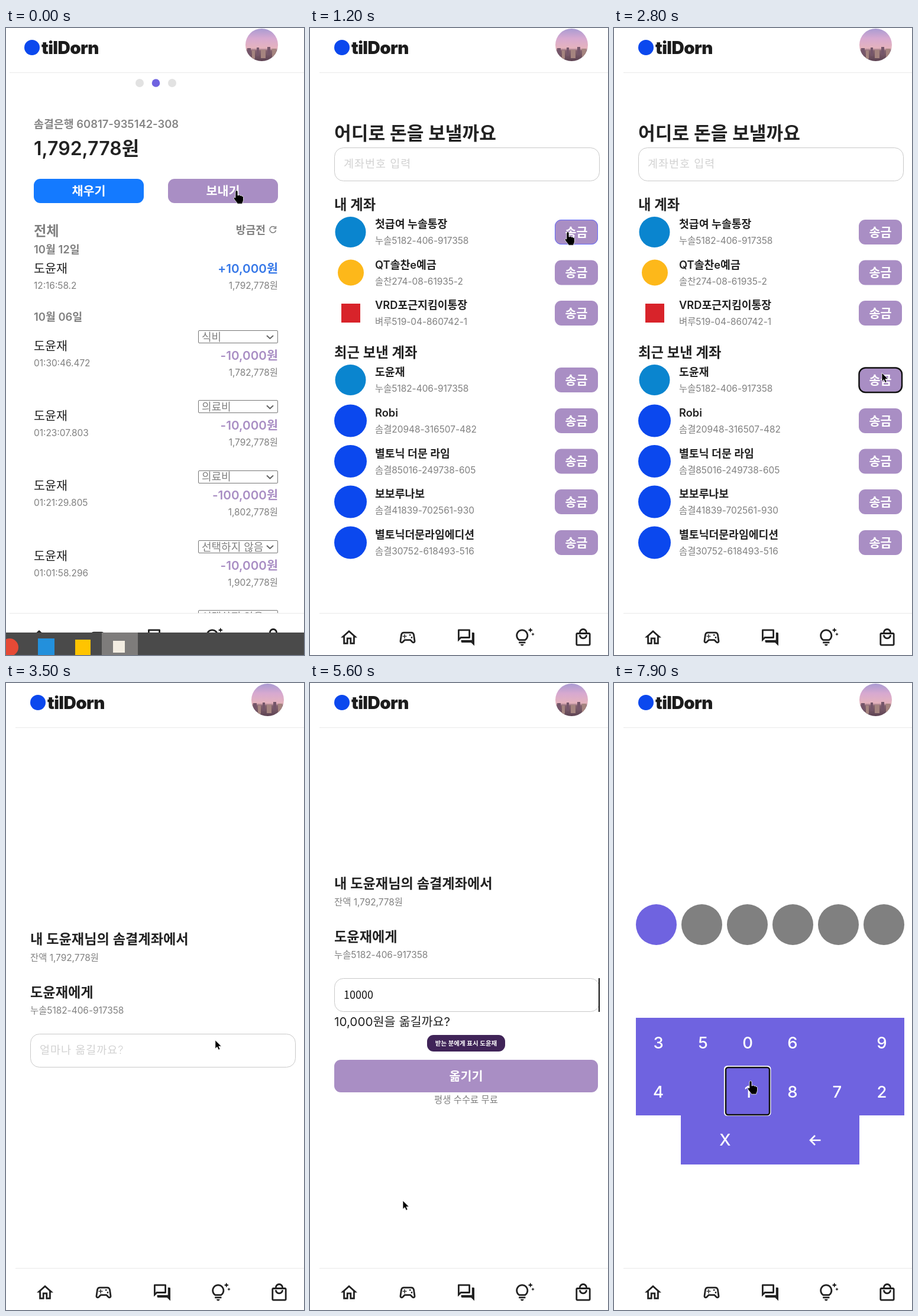
Animation of 504 by 1060 pixels, one loop 8 s. Source, as an HTML page:

```html
<!DOCTYPE html>
<html lang="ko">
<head>
<meta charset="utf-8">
<style>
html, body { margin: 0; height: 100%; overflow: hidden; background: #fff; }
svg { display: block; width: 504px; height: 1060px; font-family: Inter, 'Noto Sans CJK KR', sans-serif; }
.plain { font-family: 'Noto Sans CJK KR', 'Noto Sans CJK', sans-serif; }
text { white-space: pre; }
</style>
</head>
<body>
<svg id="stage" viewBox="0 0 504 1060"></svg>
<script>
const INK = '#222', GRAY = '#808080', LILAC = '#a98ec4', VIOLET = '#6f63e0', BLUE = '#0b48ee';
const BANK = '솜결', OWNER = '도윤재', ACCOUNT = '누솔5182-406-917358', BALANCE = '1,792,778원';

// Text centred vertically on cy
const text = (x, cy, s, size, fill = INK, weight = 400, anchor = 'start', extra = '') =>
  `<text x="${x}" y="${cy + size * .37}" font-size="${size}" fill="${fill}" font-weight="${weight}" text-anchor="${anchor}" ${extra}>${s}</text>`;
const rect = (x, y, w, h, fill, r = 0, extra = '') =>
  `<rect x="${x}" y="${y}" width="${w}" height="${h}" rx="${r}" fill="${fill}" ${extra}/>`;
const circle = (x, y, r, fill) => `<circle cx="${x}" cy="${y}" r="${r}" fill="${fill}"/>`;
const ring = (x, y, w, h, r, color = '#111', width = 2.5) =>
  rect(x, y, w, h, 'none', r, `stroke="${color}" stroke-width="${width}"`);
const button = (x, y, w, h, label, fill = LILAC) =>
  rect(x, y, w, h, fill, 11) + text(x + w / 2, y + h / 2, label, 20.7, '#fff', 600, 'middle');
const field = (y, value, hint) => ring(41.5, y + .5, 448, 56, 15, '#c9c9c9', 1) +
  (value ? text(57, y + 28, value, 18, '#111', 400, 'start', 'class="plain"')
         : text(57, y + 27.5, hint, 18.5, '#d2d2d2', 300, 'start', 'letter-spacing="1"'));

const icons = [
  'M12 5.69l5 4.5V18h-2v-6H9v6H7v-7.81l5-4.5M12 3L2 12h3v8h6v-6h2v6h6v-8h3L12 3z',
  'M21.58 16.09l-1.09-7.66C20.21 6.46 18.52 5 16.53 5H7.47C5.48 5 3.79 6.46 3.51 8.43l-1.09 7.66C2.2 17.63 3.39 19 4.94 19c.68 0 1.32-.27 1.8-.75L9 16h6l2.25 2.25c.48.48 1.13.75 1.8.75 1.56 0 2.75-1.37 2.53-2.91zm-2.1.72c-.08.09-.21.19-.42.19-.15 0-.29-.06-.39-.16L15.83 14H8.17l-2.84 2.84c-.1.1-.24.16-.39.16-.21 0-.34-.1-.42-.19-.08-.09-.16-.23-.13-.44l1.09-7.66C5.63 7.74 6.48 7 7.47 7h9.06c.99 0 1.84.74 1.98 1.72l1.09 7.66c.03.2-.05.34-.12.43zM9 8H8v2H6v1h2v2h1v-2h2v-1H9zM16 12a1 1 0 0 0 2 0 1 1 0 0 0-2 0zM14 9a1 1 0 0 0 2 0 1 1 0 0 0-2 0z',
  'M15 4v7H5.17L4 12.17V4h11m1-2H3c-.55 0-1 .45-1 1v14l4-4h10c.55 0 1-.45 1-1V3c0-.55-.45-1-1-1zm5 4h-2v9H6v2c0 .55.45 1 1 1h11l4 4V7c0-.55-.45-1-1-1z',
  'M7 20h4c0 1.1-.9 2-2 2s-2-.9-2-2zm-2-1h8v-2H5v2zm11.5-9.5c0 3.82-2.66 5.86-3.77 6.5H5.27c-1.11-.64-3.77-2.68-3.77-6.5C1.5 5.36 4.86 2 9 2s7.5 3.36 7.5 7.5zm-2 0C14.5 6.47 12.03 4 9 4S3.5 6.47 3.5 9.5c0 2.47 1.49 3.89 2.35 4.5h6.3c.86-.61 2.35-2.03 2.35-4.5zm6.87-2.13L20 8l1.37.63L22 10l.63-1.37L24 8l-1.37-.63L22 6l-.63 1.37zM19 6l.94-2.06L22 3l-2.06-.94L19 0l-.94 2.06L16 3l2.06.94L19 6z',
  'M19 6h-2c0-2.76-2.24-5-5-5S7 3.24 7 6H5c-1.1 0-2 .9-2 2v12c0 1.1.9 2 2 2h14c1.1 0 2-.9 2-2V8c0-1.1-.9-2-2-2zm-7-3c1.66 0 3 1.34 3 3H9c0-1.66 1.34-3 3-3zm7 17H5V8h14v12zm-7-8c-1.66 0-3-1.34-3-3H7c0 2.76 2.24 5 5 5s5-2.24 5-5h-2c0 1.66-1.34 3-3 3z'
];

const defs = `<defs>
  <linearGradient id="sky" x2="0" y2="1"><stop stop-color="#a99bd2"/><stop offset=".3" stop-color="#d7a9d0"/>
  <stop offset=".6" stop-color="#e5b3bd"/><stop offset=".68" stop-color="#85636f"/><stop offset="1" stop-color="#5c4252"/></linearGradient>
  <clipPath id="face"><circle cx="442.5" cy="28.5" r="27.5"/></clipPath></defs>`;

const skyline = [[418, 34, 6], [426, 38, 5], [434, 33, 4], [441, 37, 8], [452, 32, 5], [460, 35, 7]]
  .map(([x, y, w], i) => rect(x, y, w, 14, i % 2 ? '#a5847f' : '#75566a')).join('');

// Header and tab bar shared by every page
const frame = defs + rect(16, 75, 498, 1, '#e9e9e9') + circle(54, 33, 13, BLUE) +
  text(70, 33.5, 'tilDorn', 29.5, '#1c1c1c', 900, 'start', 'letter-spacing="-.6"') +
  `<g clip-path="url(#face)">${rect(415, 1, 55, 55, 'url(#sky)')}${skyline}</g>` +
  rect(16, 989, 498, 71, '#fff') + rect(16, 989, 498, 1, '#e9e9e9') +
  icons.map((d, i) => `<path fill="${INK}" transform="translate(${66 + 99 * i} 1030.5) scale(1.4) translate(-12 -12)" d="${d}"/>`).join('');

function history() {
  const rows = [
    ['식비', '01:30:46.472', '-10,000원', '1,782,778원'],
    ['의료비', '01:23:07.803', '-10,000원', '1,792,778원'],
    ['의료비', '01:21:29.805', '-100,000원', '1,802,778원'],
    ['선택하지 않음', '01:01:58.296', '-10,000원', '1,902,778원'],
    ['선택하지 않음', '', '', '']
  ];
  const head = circle(226, 93, 7, '#e2e2e2') + circle(253.5, 93, 6.8, VIOLET) + circle(281, 93, 7, '#e2e2e2') +
    text(47, 162, BANK + '은행 60817-935142-308', 18.4, '#868686', 600) +
    text(47, 203, BALANCE, 32, INK, 600) +
    button(47, 255, 186, 41, '채우기', '#147aff') + button(274, 255, 186, 41, '보내기') +
    text(47, 342, '전체', 23.2, GRAY, 600) + text(439, 341, '방금전', 18.2, GRAY, 600, 'end') +
    `<path d="M455.5 337.5a5.3 5.3 0 1 0 1 4.5M456.5 335v4h-4" fill="none" stroke="${GRAY}" stroke-width="1.5"/>` +
    text(47, 374, '10월 12일', 18.4, GRAY, 600) + text(47, 406, OWNER, 20.7, INK, 500) +
    text(460, 406, '+10,000원', 20.7, '#3678e8', 600, 'end') +
    text(47, 435, '12:16:58.2', 15.4, GRAY) + text(460, 435, BALANCE, 15.4, GRAY, 400, 'end') +
    text(47, 488, '10월 06일', 18.4, GRAY, 600);
  return head + rows.map(([kind, time, sum, left], i) => {
    const y = 511 + i * 118.3;
    return ring(325.5, Math.round(y) + .5, 134, 21, 1.5, '#767676', 1) +
      text(331, y + 11, kind, 18, GRAY, 300, 'start', 'class="plain"') +
      `<path d="M441 ${y + 9}l5.5 5 5.5-5" fill="none" stroke="#666" stroke-width="2"/>` +
      (time && text(47, y + 26, OWNER, 20.7, INK, 500) + text(47, y + 55, time, 15.4, GRAY) +
        text(460, y + 42, sum, 20.7, LILAC, 600, 'end') + text(460, y + 71, left, 15.4, GRAY, 400, 'end'));
  }).join('');
}

const taskbar = dy => `<g transform="translate(0 ${dy})">` + rect(0, 1022, 504, 38, '#4a4a4a') +
  circle(6, 1047, 15, '#e64a36') + rect(54, 1032, 28, 28, '#2390dc') + rect(117, 1034, 26, 26, '#ffc400') +
  rect(162, 1022, 61, 38, '#7e7c7b') + rect(181, 1036, 20, 20, '#f3ede2') + '</g>';

const people = [
  [345, '첫급여 누솔통장', ACCOUNT, y => circle(68.5, y, 26, '#0a85cf')],
  [413.5, 'QT솔찬e예금', '솔찬274-08-61935-2', y => circle(69, y, 22, '#fdb81a')],
  [482, 'VRD포근지킴이통장', '벼루519-04-860742-1', y => rect(53, y - 16, 32, 32, '#d8232a')],
  [595, OWNER, ACCOUNT, y => circle(68.5, y, 26, '#0a85cf')],
  [664, 'Robi', BANK + '20948-316507-482'],
  [732.5, '별토닉 더문 라임', BANK + '85016-249738-605'],
  [801, '보보루나보', BANK + '41839-702561-930'],
  [870, '별토닉더문라임에디션', BANK + '30752-618493-516']
];
const sendHit = (x, y) => people.findIndex(p => x > 414 && x < 487 && Math.abs(y - p[0]) < 21);

function list(t, x, y) {
  const hover = t < 2700 ? sendHit(x, y) : -1;
  return text(41, 177, '어디로 돈을 보낼까요', 31.2, INK, 600) + field(202, '', '계좌번호 입력') +
    text(41, 298.5, '내 계좌', 23.3, INK, 600) + text(41, 548.5, '최근 보낸 계좌', 23.3, INK, 600) +
    people.map(([cy, name, number, icon = y => circle(68.5, y, 27.5, BLUE)], i) =>
      icon(cy) + text(110, cy - 13.5, name, 18.3, INK, 600) + text(110, cy + 14.5, number, 15.4, GRAY) +
      button(414, cy - 21, 73, 42, '송금') +
      (i === hover ? ring(414.5, cy - 20.5, 72, 41, 10.5, '#646cff', 1) : '') +
      (i === 3 && t >= 2800 ? ring(414.5, cy - 20.5, 72.5, 41.5, 11) : '')).join('');
}

// Sender, receiver and amount; dy shifts the block so that it stays centred
const amount = (dy, value) => `<g transform="translate(0 ${dy})">` +
  text(41, 290, `내 ${OWNER}님의 ${BANK}계좌에서`, 23.2, INK, 600) + text(41, 322, '잔액 ' + BALANCE, 15.4, GRAY) +
  text(41, 380, OWNER + '에게', 23.2, INK, 600) + text(41, 411, ACCOUNT, 15.4, GRAY) +
  field(451, value, '얼마나 옮길까요?') + '</g>';

const keyWidth = { 1: 64, 4: 69, 7: 67, '00': 82, '&lt;-': 78 };
function keypad(t) {
  const focus = t < 4200 ? '' : t < 4700 ? '1' : '00';
  const value = t < 4400 ? '' : t < 4700 ? '1' : t < 4900 ? '100' : '10000';
  return amount(0, value) + ['1', '2', '3', '4', '5', '6', '7', '8', '9', '00', '0', '&lt;-'].map((k, i) => {
    const w = keyWidth[k] || 68, x = 108 + i % 3 * 156, y = 535.5 + Math.floor(i / 3) * 76.3;
    return rect(x - w / 2, y - 27, w, 54, '#f9f9f9', 11) + text(x, y, k, 21.5, '#111', 500, 'middle') +
      (k === focus ? ring(x - w / 2 + .5, y - 26.5, w - 1, 53.5, 11) : '');
  }).join('');
}

const confirmPage = () => amount(48, '10000') + rect(488, 499, 2, 57, '#111') +
  text(41, 572, '10,000원을 옮길까요?', 20.7) + rect(198, 595, 132, 28, '#402458', 11) +
  text(264, 609, `받는 분에게 표시 ${OWNER}`, 10.5, '#fff', 600, 'middle') +
  button(41, 637, 446, 55, '옮기기') + text(264, 704, '평생 수수료 무료', 15.4, GRAY, 400, 'middle');

function pin(t) {
  const pressed = t >= 7600;
  const dots = Array.from({ length: 6 }, (_, i) => circle(71.5 + i * 77, 408.5, 34.5, pressed && !i ? VIOLET : GRAY));
  const digits = [...'3506 94 1872'].map((d, i) =>
    text(75 + i % 6 * 75.6, i < 6 ? 607.5 : 690.5, d, 27.5, '#fff', 500, 'middle'));
  return dots.join('') + rect(37, 566, 454, 165, VIOLET) + rect(113, 731, 302, 83, VIOLET) + digits.join('') +
    text(188, 772, 'X', 27.5, '#fff', 500, 'middle') +
    '<path d="M349.5 773H332m8-8-8 8 8 8" fill="none" stroke="#fff" stroke-width="2.6"/>' +
    (pressed ? ring(187.5, 648.5, 76.5, 82, 4, '#fff', 3) + ring(189, 650, 74, 80, 4) : '');
}

const track = [
  [0, 390, 275], [500, 390, 275], [1000, 436, 345], [1300, 436, 345], [2500, 453, 583], [3200, 453, 583],
  [3700, 300, 615], [3900, 300, 615], [4200, 98, 521], [4400, 98, 521], [4600, 100, 750], [5000, 100, 750],
  [5400, 157, 875], [5700, 157, 875], [6200, 198, 674], [6700, 198, 674], [7200, 231, 673], [8000, 231, 673]
];
function pointerAt(t) {
  const i = track.findIndex(k => k[0] > t), [t0, x0, y0] = track[i - 1], [t1, x1, y1] = track[i];
  const u = (t - t0) / (t1 - t0), e = u * u * (3 - 2 * u);
  return [x0 + (x1 - x0) * e, y0 + (y1 - y0) * e];
}
const HAND = 'M-2 2c0-3 4-3 4 0v6h1c1-1.5 3-1 3.2.6 1-1 3-.6 3 1 1.2-.6 2.3.2 2.3 1.6v4c0 3-1.5 4-2 7h-8c-.5-2-4-5-6-8.5-1-2 1-3.2 2.4-1.6z';
const ARROW = 'M0 0V14.5l3.3-3 2.3 5 2.6-1.2-2.3-4.9h4.6z';
const pointer = (x, y, hand) =>
  `<path transform="translate(${x} ${y})" d="${hand ? HAND : ARROW}" stroke="#fff" stroke-width=".8"/>`;

// Each page: end time, drawing, whether the pointer is a hand
const pages = [
  [500, history, () => true],
  [3000, list, (t, x, y) => t < 2700 && sendHit(x, y) >= 0],
  [3900, () => amount(142, ''), () => false],
  [5500, keypad, (t, x, y) => y > 508 && y < 792 && Math.abs(x - 108) < 41],
  [6500, confirmPage, (t, x, y) => y > 637 && y < 692],
  [8000, pin, () => true]
];

const stage = document.getElementById('stage');
let last = -1;
function draw() {
  const t = Math.floor(performance.now() % 8000 / 100) * 100;
  if (t !== last) {
    last = t;
    const [x, y] = pointerAt(t), [, page, hand] = pages.find(p => t < p[0]), home = page === history;
    stage.innerHTML = page(t, x, y) + `<g transform="translate(${home ? -10 : 0} 0)">${frame}</g>` +
      (home ? taskbar(Math.max(0, t - 200) / 200 * 38) : '') + pointer(x, y, hand(t, x, y));
  }
  requestAnimationFrame(draw);
}
draw();
</script>
</body>
</html>
```
